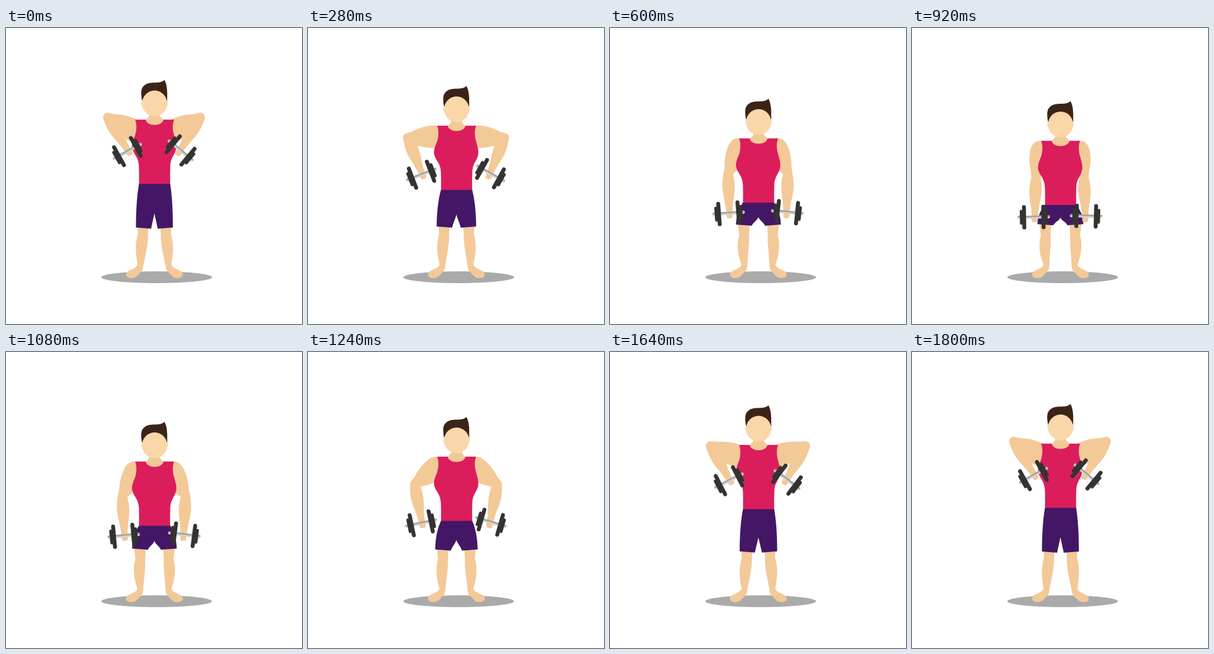
An HTML page that plays this animation: 500x500 px, repeating every 1.88 s.

```html
<!DOCTYPE html>
<html lang="en">
<head>
<meta charset="utf-8">
<title>Dumbbell upright row</title>
<style>
  html, body { margin: 0; width: 100%; height: 100%; overflow: hidden; background: #fff; }
  svg { display: block; width: 100vw; height: 100vh; }
  .skin { fill: #f3c998; }
  .face { fill: #f9d7a9; }
  .hair { fill: #3b2417; }
  .shirt { fill: #db1d5c; }
  .shorts { fill: #431766; }
  .plate { stroke: #333331; stroke-linecap: round; }
</style>
</head>
<body>
<svg viewBox="0 0 500 500">
  <defs>
    <path id="foot" d="M222 399 Q222 403 216 406 L206 411 Q202 414 203 418 Q205 423 213 422.5 Q219 422 224 416 L230 409.500 Q232.500 406 231.500 399Z"/>
    <path id="upper" d="M0-15 C-12-15 -16-4 -16 6 C-16 18 -14 28 -9.500 40 L-8 48 A8 8 0 0 0 8 48 L8 45 C12 38 16 32 18 25 C21 15 23 8 22-2 C20-10 10-15 0-15Z"/>
    <path id="fore" d="M-8 0 C-9.500 8 -10.800 14 -10.500 24 C-10 36 -7 46 -6 57 L-5.200 71 Q-5 75 -1 75 L2 75 Q5 75 5 71 L5.600 57 C6.500 46 9.500 36 10.300 24 C10.600 14 9.500 8 8 0Z"/>
    <g id="bell">
      <rect x="-27.500" y="-2.600" width="55" height="5.200" rx="2" fill="#d3d3d3"/>
      <path d="M-27.500 0 Q-27.500-2.600 -25.500-2.600 H25.500 Q27.500-2.600 27.500 0Z" fill="#a3a3a3"/>
      <path class="plate" d="M-21-10V10M21-10V10" stroke-width="5"/>
      <path class="plate" d="M-16.300-17.300V17.300M16.300-17.300V17.300" stroke-width="6.600"/>
    </g>
    <g id="arm" class="skin">
      <use id="upperArm" href="#upper"/>
      <use id="foreArm" href="#fore"/>
    </g>
    <g id="limb" class="skin">
      <path id="leg"/>
      <use href="#foot"/>
    </g>
  </defs>

  <ellipse cx="254.500" cy="421" rx="93.500" ry="10" fill="#aaa"/>
  <use href="#limb"/>
  <use href="#limb" transform="translate(501.500 0) scale(-1 1)"/>
  <path id="shorts" class="shorts"/>

  <g id="body">
    <use href="#arm"/>
    <use href="#arm" transform="translate(500 0) scale(-1 1)"/>
    <path class="shirt" d="M218 0 H284 C281 7 281 17 284 27 C286 34 288.500 41 287.500 48 C286 60 278.500 62 277.500 78 Q277 92 277.300 108.500 H224.700 Q225 92 224.500 78 C223.500 62 216 60 213 48 C212 41 215 34 218 27 C221 17 221 7 218 0Z"/>
    <path class="skin" d="M243-10 Q242-4 236 0 C238 12 264 12 266 0 Q260-4 259-10Z"/>
    <path class="hair" d="M229.800-32 C228-42 227.500-50 231-55 C236-62 244-62.500 252-62.500 Q263-62.500 267.800-67 C271-61 272-54 272.300-46 L272.300-32Z"/>
    <ellipse class="face" cx="230.300" cy="-28" rx="1.600" ry="4.500"/>
    <ellipse class="face" cx="271.700" cy="-28" rx="1.600" ry="4.500"/>
    <ellipse class="face" cx="251" cy="-27.500" rx="21.200" ry="21.800"/>
    <use id="bellL" href="#bell"/>
    <use id="bellR" href="#bell"/>
  </g>
</svg>
<script>
const LOOP = 1880, STEP = 40, LOW = 800, TOP = 1800;
const $ = id => document.getElementById(id);
const set = (id, name, value) => $(id).setAttribute(name, value);
const rad = deg => deg * Math.PI / 180;
const ease = k => (1 - Math.cos(Math.PI * k)) / 2;

// 0 = weights raised, 1 = weights lowered
function lowered(ms) {
  const t = Math.min(Math.floor(ms / STEP) * STEP, TOP);
  return t < LOW ? ease(t / LOW) : 1 - ease((t - LOW) / (TOP - LOW));
}

function poseArms(p) {
  const swing = 113 - 109 * p, bend = 31.5 - 34.5 * p;
  const a = rad(swing), b = rad(bend);
  const ex = 216 - 48 * Math.sin(a), ey = 15 + 48 * Math.cos(a);
  const gx = -1.7, gy = 66.5;
  const hx = ex + gx * Math.cos(b) + gy * Math.sin(b);
  const hy = ey - gx * Math.sin(b) + gy * Math.cos(b);
  set('upperArm', 'transform', `translate(216 15) rotate(${swing})`);
  set('foreArm', 'transform', `translate(${ex} ${ey}) rotate(${-bend})`);
  set('bellL', 'transform', `translate(${hx} ${hy}) rotate(${-29 * (1 - p)})`);
  set('bellR', 'transform', `translate(${500 - hx} ${hy - 1.8}) rotate(${40 * (1 - p)})`);
}

function poseLegs(p) {
  const kneeY = 347 + 4 * p, calf = 218.2 - 4.5 * p;
  set('leg', 'd', `M${221.8 - 7 * p} 328 L${223 - 5.5 * p} ${kneeY}
    C${calf} 363 ${calf} 381 223 402 L232 402
    C${235.5 - 3.5 * p} 382 ${240.5 - 5.5 * p} 367 ${240 - 6 * p} ${kneeY}
    L${241.3 - 6.3 * p} 328Z`);
}

function poseShorts(p, top) {
  const mid = 250.7, cy = 313 + 7.5 * p;
  const outX = mid - 219.5 + 8 * p, outY = 337 - 6 * p;
  const inX = 5.6 + 6.5 * p, inY = 339 - 6 * p;
  const drop = inY - cy;
  const bowX = outX - p, bowY = top + (outY - top) * 0.4;
  const c1 = [inX / 3 - 2 * p, cy + drop / 3 + p];
  const c2 = [inX * 2 / 3 + 1.5 * p, cy + drop * 2 / 3 - 1.5 * p];
  const at = (side, x, y) => `${mid + side * x} ${y}`;
  set('shorts', 'd', `M${at(-1, 26, top)} Q${at(-1, bowX, bowY)} ${at(-1, outX, outY)}
    L${at(-1, inX, inY)} C${at(-1, ...c2)} ${at(-1, ...c1)} ${at(1, 0, cy)}
    C${at(1, ...c1)} ${at(1, ...c2)} ${at(1, inX, inY)}
    L${at(1, outX, outY)} Q${at(1, bowX, bowY)} ${at(1, 26.6, top)}Z`);
}

function draw(ms) {
  const p = lowered(ms), y = 154.8 + 37 * p;
  set('body', 'transform', `translate(0 ${y})`);
  poseArms(p);
  poseLegs(p);
  poseShorts(p, y + 108);
}

const start = performance.now();
function tick() {
  draw((performance.now() - start) % LOOP);
  requestAnimationFrame(tick);
}
tick();
</script>
</body>
</html>
```
